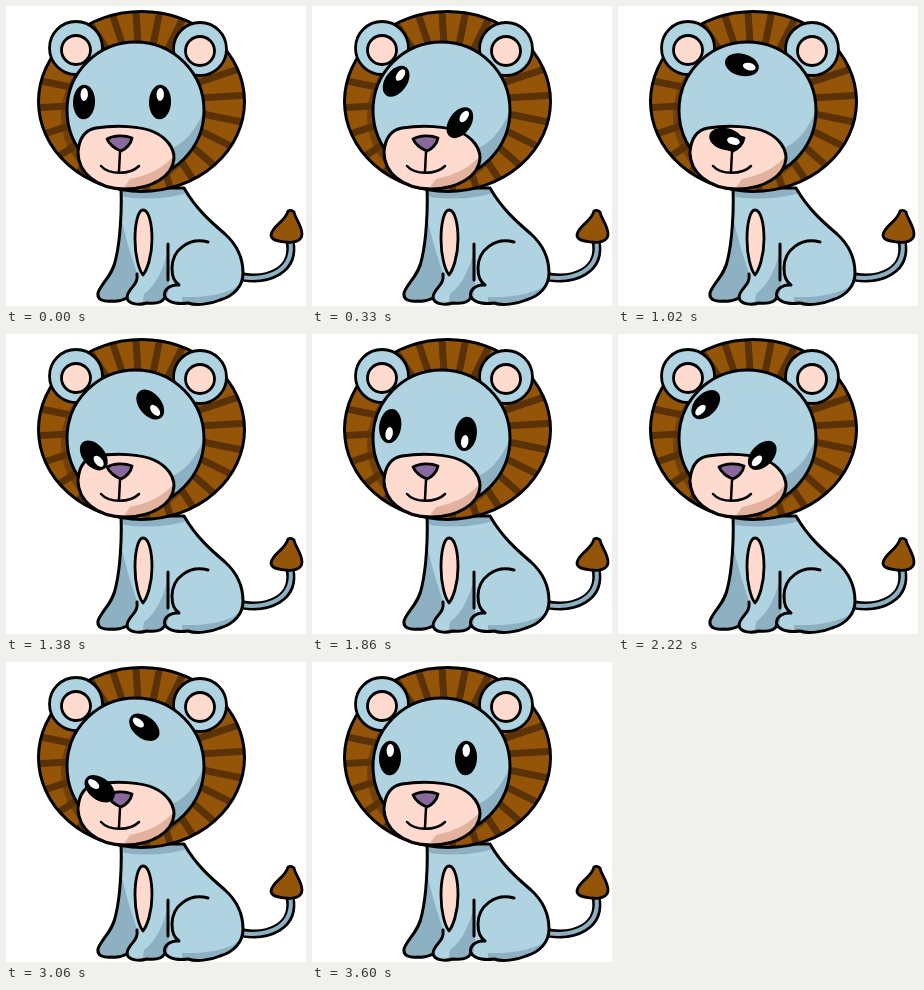
An HTML page for the animation above (3.63 s loop, 300x300 px).

```html
<!DOCTYPE html>
<html lang="en">
<head>
<meta charset="utf-8">
<title>Lion with turning eyes</title>
<style>
html, body { margin: 0; width: 100%; height: 100%; overflow: hidden; background: #fff; }
svg { display: block; width: 100vw; height: 100vh; }
.line { fill: none; stroke: #000; stroke-width: 3; stroke-linecap: round; stroke-linejoin: round; }
.thin { stroke-width: 2.5; }
.ink { stroke: #000; stroke-width: 2.8; stroke-linejoin: round; }
.blue { fill: #afd3e1; }
.dim { fill: #8db1c3; }
.pink { fill: #ffdace; }
.rose { fill: #e2b29f; }
.brown { fill: #945509; }
</style>
</head>
<body>
<svg viewBox="0 0 300 300">
  <defs>
    <path id="body" d="M115 182C116 205 114 235 110 252C107 270 95 277 92 287C91 294 98 296 106 295C112 296 117 294 121 292C123 299 134 299 141 297C150 298 157 296 159 291C163 298 175 298 182 297C190 300 205 298 214 294C228 290 237 280 237 267C237 250 230 238 219 228C205 216 190 203 178 182Z"/>
    <ellipse id="face" cx="129.5" cy="104.5" rx="68.5" ry="68.5"/>
    <path id="snout" d="M72 146C73 134 78 124 90 122C110 119 135 120 148 126C161 132 168 142 168 152C167 170 146 183 119 183C90 183 72 166 72 146Z"/>
    <clipPath id="inBody"><use href="#body"/></clipPath>
    <clipPath id="inFace"><use href="#face"/></clipPath>
    <clipPath id="inSnout"><use href="#snout"/></clipPath>
    <clipPath id="inMane"><ellipse cx="135.5" cy="95.5" rx="103" ry="90"/></clipPath>
    <g id="ear">
      <circle class="blue ink" r="26.5"/>
      <circle class="pink ink" cy="2" r="14.5"/>
    </g>
    <g id="eye" transform="rotate(2)">
      <ellipse rx="11" ry="17.2"/>
      <ellipse cy="-7.6" rx="3.7" ry="6.5" fill="#fff"/>
    </g>
  </defs>

  <path class="line" style="stroke-width:9" d="M237 271C262 275 290 265 284 235"/>
  <path d="M235 271C262 275 290 265 284 233" fill="none" stroke="#8db1c3" stroke-width="4"/>
  <path class="brown ink" d="M282 205C280 215 266 220 265 229C265 235 274 235 279 236C286 237 296 236 296 228C296 220 289 212 288 206C286 204 284 204 282 205Z"/>

  <use href="#body" class="blue"/>
  <g clip-path="url(#inBody)" class="dim">
    <path d="M112 182L118 191C142 194 163 193 184 186L180 178Z"/>
    <path d="M113 198C117 225 125 250 132 270C131 280 120 283 121 300L88 300L100 262Z"/>
    <path d="M163 240C158 262 151 278 138 288L136 300L160 300L163 278Z"/>
    <path d="M240 274C228 286 205 292 176 291L176 302L240 302Z"/>
  </g>
  <use href="#body" class="line"/>
  <path class="line" d="M131 268C133 280 121 282 121 292M162 238L162 274M202 236C183 231 166 244 166 262C166 271 168 275 173 279C163 278 157 285 159 291"/>
  <path class="pink ink" d="M137 204C143 204 146 218 146 233C146 250 141 264 137 269C133 264 129 250 129 233C129 218 132 204 137 204Z"/>

  <g clip-path="url(#inMane)">
    <rect class="brown" x="30" width="212" height="190"/>
    <g id="stripes" stroke="#5b3206" stroke-width="7"></g>
    <ellipse cx="125" cy="110" rx="70" ry="71" fill="#5b3206" opacity=".6"/>
  </g>
  <ellipse class="line" cx="135.5" cy="95.5" rx="103" ry="90"/>

  <use href="#ear" x="70" y="42"/>
  <use href="#ear" x="194" y="43"/>
  <use href="#face" class="blue"/>
  <path clip-path="url(#inFace)" class="dim" d="M202 92C194 120 180 137 164 143L166 164L140 186L200 180Z"/>
  <use href="#face" class="line"/>

  <use href="#snout" class="pink"/>
  <path clip-path="url(#inSnout)" class="rose" d="M171 146C161 160 145 169 124 173L112 190L172 190Z"/>
  <use href="#snout" class="line"/>
  <path class="ink" d="M101 133C108 129 119 129 126 132C125 138 120 143 115 145C109 143 103 138 101 133Z" fill="#89699c"/>
  <path class="line thin" d="M114 146L113 165M95 160C103 169 124 169 133 160"/>

  <g id="eyes">
    <use href="#eye" x="-38"/>
    <use href="#eye" x="38"/>
  </g>
</svg>
<script>
const STEP = 30, STEPS = 121, TURN = 3;
const eyes = document.getElementById('eyes');
const stripes = document.getElementById('stripes');

// dark rays across the mane
const RAYS = 24;
for (let i = 0; i < RAYS; i++) {
  const ray = document.createElementNS('http://www.w3.org/2000/svg', 'path');
  ray.setAttribute('d', 'M50 0H110');
  ray.setAttribute('transform', `translate(135.5 95.5) rotate(${360 * i / RAYS - 3.5})`);
  stripes.append(ray);
}

// three degrees per step; the last step of the loop completes the turn
function draw(ms) {
  const step = Math.floor(ms / STEP) % STEPS;
  eyes.setAttribute('transform', `translate(116 96) rotate(${TURN * step})`);
}

const start = performance.now();
function tick() {
  draw(performance.now() - start);
  requestAnimationFrame(tick);
}
draw(0);
requestAnimationFrame(tick);
</script>
</body>
</html>
```
